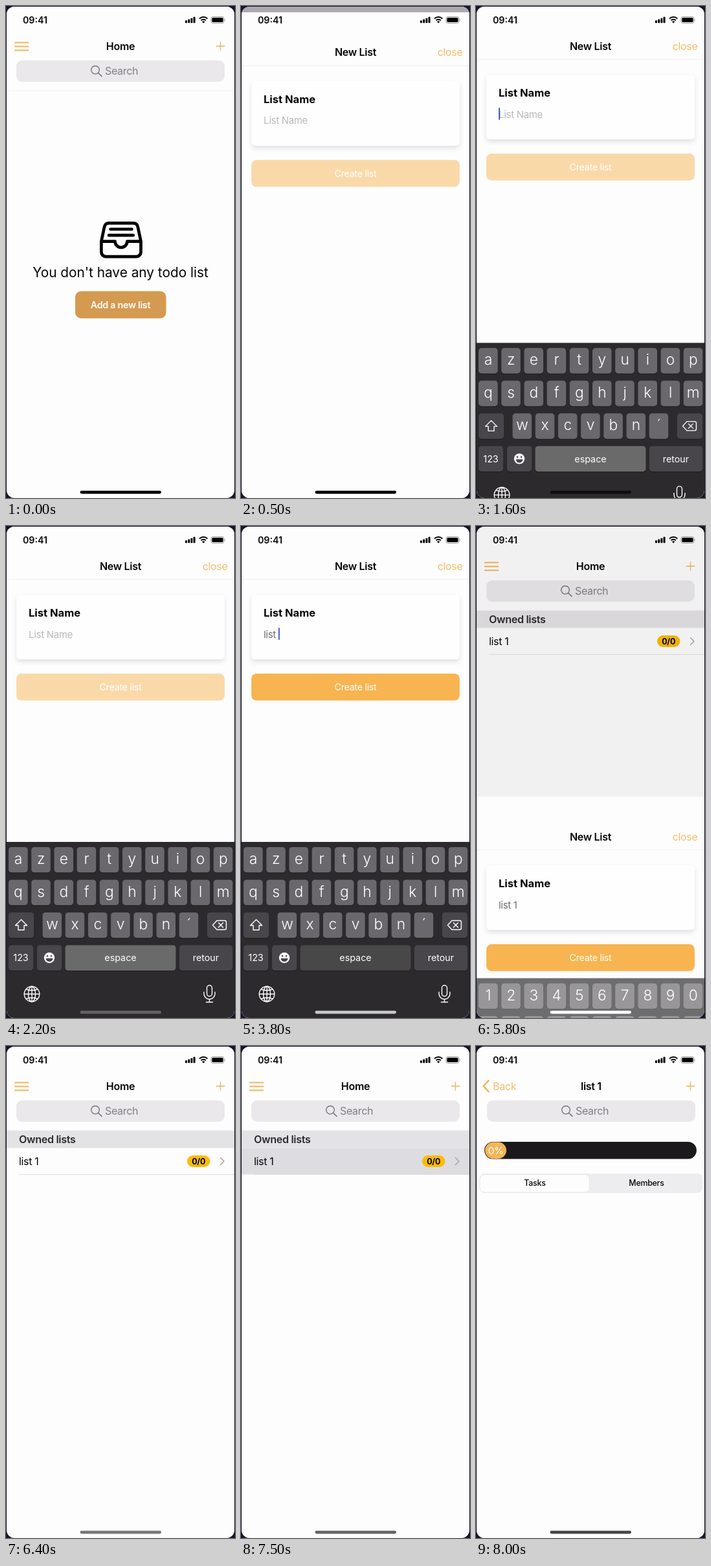
An HTML page for the animation above (8100 ms loop, 354 by 760 pixels).

```html
<!DOCTYPE html>
<html lang="en">
<head>
<meta charset="utf-8">
<title>Todo list demo</title>
<style>
html, body { margin: 0; width: 100%; height: 100%; overflow: hidden; background: #15142a; }
svg { display: block; width: 100vw; height: 100vh; }
svg { font-family: Inter, Roboto, sans-serif; letter-spacing: -0.02em; }
text { white-space: pre; }
.loose { letter-spacing: 0; }
</style>
</head>
<body>
<svg id="stage" viewBox="0 0 354 760"></svg>
<script>
const LOOP = 8100;
const PAPER = '#fdfdfd', INK = '#050505', AMBER = '#f7b450', SOFT = '#f3bd6d';
const KEY = '#6a686c', DARK_KEY = '#48464a';

// ---- markup helpers ----
const text = (x, cy, str, size, { w = 400, fill = INK, at = 'start', id = '', cls = '' } = {}) =>
  `<text id="${id}" class="${cls}" x="${x}" y="${(cy + size * 0.36).toFixed(2)}" font-size="${size}" font-weight="${w}" fill="${fill}" text-anchor="${at}" style="letter-spacing:${cls ? 0 : -0.02}em">${str}</text>`;
const box = (x, y, w, h, r, fill, more = '') =>
  `<rect x="${x}" y="${y}" width="${w}" height="${h}" rx="${r}" fill="${fill}" ${more}/>`;
const line = (d, color, width, more = '') =>
  `<path d="${d}" fill="none" stroke="${color}" stroke-width="${width}" ${more}/>`;
const group = (id, ...parts) => `<g id="${id}">${parts.join('')}</g>`;
const round = 'stroke-linecap="round" stroke-linejoin="round"';

const search = () =>
  box(16, 84, 322, 33, 9, '#eae8eb') +
  '<circle cx="138" cy="98.8" r="6.3" fill="none" stroke="#77757a" stroke-width="1.4"/>' +
  line('M142.6 103.4L148 108.6', '#77757a', 1.5, round) +
  text(153, 100.3, 'Search', 16, { fill: '#807e83' });

const emptyState = () => group('empty',
  line('M1 131H353', '#f1f0f2', 1),
  `<g transform="translate(140.3 323.6) scale(.147)" ${round}>` +
  line('M384 80H128c-26 0-43 14-48 40L48 272v112a48 48 0 0048 48h320a48 48 0 0048-48V272l-32-152c-5-27-23-40-48-40z' +
    'M48 272h144M320 272h144M192 272a64 64 0 00128 0M144 144h224M128 208h256', '#000', 32) + '</g>',
  text(177, 412, "You don't have any todo list", 20.8, { at: 'middle', cls: 'loose' }),
  box(107, 440.5, 140.5, 42, 9, AMBER, 'id="add"'),
  text(177, 461.5, 'Add a new list', 14.3, { w: 600, fill: '#fff', at: 'middle' }));

const ownedLists = () => group('owned',
  box(1, 130.5, 352, 27, 0, '#e3e2e4'),
  text(20, 144.3, 'Owned lists', 16.1, { w: 600, fill: '#2c2a2d' }),
  box(1, 157.5, 352, 41, 0, '#dddce0', 'id="row"'),
  text(20, 178, 'list 1', 16),
  box(280, 169, 35.5, 18, 9, '#fabb0a'),
  text(297.7, 178, '0/0', 12.6, { w: 700, at: 'middle' }),
  line('M331.5 172.5L337 178L331.5 183.5', '#a9a7ac', 1.6, round),
  line('M20 198.5H353', '#dedde0', 1));

const detail = () => group('detail',
  box(0, 78, 354, 682, 0, PAPER),
  search(),
  box(12, 148, 328, 26.5, 13.2, '#1b191c'),
  box(13, 148.5, 33, 25.5, 12.7, '#f4b656'),
  text(29.7, 161.5, '0%', 15, { fill: '#fff', at: 'middle' }),
  box(4.5, 197, 344.5, 30, 8, '#ededef'),
  box(5, 198.5, 169.5, 27.5, 7, '#fdfdfd', 'stroke="#e1e0e3" stroke-width=".8"'),
  text(90, 211.5, 'Tasks', 12.4, { w: 500, at: 'middle' }),
  text(262.5, 211.5, 'Members', 12.4, { w: 500, at: 'middle' }));

const header = () =>
  box(0, 0, 354, 79, 0, PAPER) +
  group('homeBar', line('M13 56.5H35M13 62.5H35M13 68.5H35', '#efb55f', 2)) +
  group('homeTitle', text(177, 62, 'Home', 16, { w: 600, at: 'middle' })) +
  group('backBar', line('M19.5 53.5L11.5 62L19.5 70.5', '#f2b24f', 2.5, round),
    text(26, 62, 'Back', 16, { fill: SOFT })) +
  group('listTitle', text(177, 62, 'list 1', 16, { w: 600, at: 'middle' })) +
  line('M324.7 62H338.3M331.5 55.2V68.8', '#f0b45c', 1.4);

const modal = () => group('modal',
  box(0, 0, 354, 760, 0, PAPER),
  text(177, 62, 'New List', 16, { w: 600, at: 'middle' }),
  text(342.5, 62, 'close', 16, { fill: SOFT, at: 'end' }),
  line('M1 82.5H353', '#f0f0f1', 1),
  box(16, 106, 322, 100, 6, '#fefefe', 'filter="url(#lift)"'),
  text(35, 134, 'List Name', 16.5, { w: 700, cls: 'loose' }),
  text(35, 167.3, '', 15, { id: 'field' }),
  box(0, 157, 2, 19, 1, '#4a5fc0', 'id="caret"'),
  box(16, 228, 322, 41.5, 8, AMBER, 'id="create"'),
  text(177, 249, 'Create list', 14.3, { fill: '#fff', at: 'middle' }));

// ---- keyboard ----
const PITCH = 35.2;
const key = (x, y, w, fill, more = '') =>
  box(x, y + 1, w, 39.3, 4.5, '#1b191c') + box(x, y, w, 39.3, 4.5, fill, more);
const keyRow = (chars, x, y, w = 29.6, pitch = PITCH) => [...chars].map((c, i) =>
  key(x + i * pitch, y, w, KEY) +
  `<text x="${x + i * pitch + w / 2}" y="${y + 26}" font-size="22.8" font-weight="350" fill="#fff" text-anchor="middle">${c.replace('&', '&amp;')}</text>`).join('');
const label = (x, str, more = {}) =>
  text(x, 667, str, 14.3, { fill: '#fff', at: 'middle', cls: 'loose', ...more });

const keyboard = () => group('keyboard',
  box(0, 488, 354, 274, 0, '#2c2a2d'),
  key(4, 597, 39, DARK_KEY), key(311, 597, 39, DARK_KEY),
  group('letters',
    keyRow('azertyuiop', 4, 496), keyRow('qsdfghjklm', 4, 546.5), keyRow('wxcvbn´', 56.5, 597),
    line('M23.5 608L14.5 617H19V624H28V617H32.5Z', '#fff', 1.4, round)),
  group('digits',
    keyRow('1234567890', 4, 496), keyRow('-/:;()€&@"', 4, 546.5), keyRow(".,?!'", 56.5, 597, 43.5, 49.3),
    text(23.5, 616.5, '#+=', 14, { fill: '#fff', at: 'middle' })),
  line('M326 609.5H338Q340.5 609.5 340.5 612V621Q340.5 623.5 338 623.5H326L319.5 616.5ZM328.5 613L335.5 620M335.5 613L328.5 620', '#fff', 1.4, round),
  key(4, 647.5, 38, DARK_KEY), key(48, 647.5, 38.3, DARK_KEY),
  key(91.5, 647.5, 171, DARK_KEY, 'id="space"'), key(268, 647.5, 82.3, DARK_KEY),
  label(23, '123', { id: 'mode' }), label(177, 'espace'), label(309, 'retour'),
  '<circle cx="67" cy="667" r="8.2" fill="#fff"/>',
  '<circle cx="64" cy="664.3" r="1.3" fill="#48464a"/><circle cx="70" cy="664.3" r="1.3" fill="#48464a"/>',
  '<path d="M61.5 667.8H72.5A5.5 5.3 0 0161.5 667.8Z" fill="#48464a"/>',
  '<g fill="none" stroke="#fff" stroke-width="1.4"><circle cx="40" cy="723" r="11.8"/><ellipse cx="40" cy="723" rx="5.5" ry="11.8"/>',
  '<path d="M40 711.2V734.8M28.2 723H51.8M31 715.5Q40 719.5 49 715.5M31 730.5Q40 726.5 49 730.5"/>',
  '<rect x="310.5" y="709.5" width="8" height="17" rx="4"/><path d="M306 720V722.5A8.5 8.5 0 00323 722.5V720M314.5 731V735.5M309.5 735.5H319.5" stroke-linecap="round"/></g>');

const statusBar = () =>
  text(26, 21.7, '09:41', 14.2, { w: 600, cls: 'loose' }) +
  [4, 5.7, 7.6, 9.6].map((h, i) => box(277 + i * 4.2, 26.3 - h, 3, h, 0.8, '#000')).join('') +
  line('M299 19.6A8.6 8.6 0 01311.4 19.6M301.5 22.2A5.2 5.2 0 01308.9 22.2', '#000', 2) +
  '<path d="M305.2 26.6L303 24.3A3.2 3.2 0 01307.4 24.3Z"/>' +
  box(317, 16.5, 20, 10, 2.8, 'none', 'stroke="#8b898d" stroke-width=".9"') +
  box(318.4, 17.9, 17.2, 7.2, 1.6, '#000') +
  '<path d="M338.2 19.8Q340 21.5 338.2 23.2Z" fill="#8b898d"/>';

document.getElementById('stage').innerHTML =
  '<defs><clipPath id="screen"><rect x="1" y="1" width="352" height="759" rx="12"/></clipPath>' +
  '<filter id="lift" x="-10%" y="-20%" width="120%" height="150%"><feDropShadow dx="0" dy="4" stdDeviation="3" flood-color="#55506a" flood-opacity=".16"/></filter></defs>' +
  '<g clip-path="url(#screen)">' +
  box(0, 0, 354, 760, 0, PAPER) +
  group('home', search(), emptyState(), ownedLists()) +
  detail() + header() +
  box(0, 0, 354, 760, 0, '#170a20', 'id="dim"') +
  modal() + keyboard() + statusBar() +
  box(114.5, 748.8, 125.5, 4.6, 2.3, '#000', 'id="bar"') + '</g>';

// ---- motion ----
const $ = Object.fromEntries([...document.querySelectorAll('[id]')].filter(e => e.id).map(e => [e.id, e]));
const show = (el, on) => { el.style.display = on ? '' : 'none'; };
const move = (el, x, y = 0) => el.setAttribute('transform', `translate(${x.toFixed(2)} ${y.toFixed(2)})`);
const clamp = v => Math.min(1, Math.max(0, v));
const fade = (el, v) => { el.style.opacity = clamp(v); };

// Critically damped spring: stiffness 1000, mass 3
const spring = (t, start) => {
  const u = Math.max(0, t - start) / 1000 * Math.sqrt(1000 / 3);
  return 1 - Math.exp(-u) * (1 + u);
};
const track = (points, t) => {
  const i = points.findIndex(p => p[0] > t);
  if (i < 0) return points[points.length - 1][1];
  const [t0, a] = points[i - 1], [t1, b] = points[i];
  return a + (b - a) * (t - t0) / (t1 - t0);
};
const gray = v => `rgb(${v},${v},${v})`;

const OPEN = 153, FOCUS = 1400, DIGITS = 4200, HIDE = 5646, CLOSE = 5700, TAP = 7300, PUSH = 7557;
const TYPED = [[2500, 'l'], [2800, 'li'], [3100, 'lis'], [3400, 'list'], [3700, 'list '], [4700, 'list 1']];
const BAR = [[0, 0], [1500, 0], [2200, 98], [2700, 185], [3800, 200], [5300, 200], [5800, 255],
  [5950, 210], [6500, 100], [7500, 100], [8000, 70]];
const SPACE = [[0, 106], [2250, 106], [2550, 72]];

function draw(t) {
  const listed = t > 5000;
  show($.empty, !listed);
  show($.owned, listed);
  show($.row, t >= TAP);
  $.add.setAttribute('fill', t < 400 ? '#d49a4f' : AMBER);

  const up = t < CLOSE ? spring(t, OPEN) : 1 - spring(t, CLOSE);
  move($.modal, 0, 760 * (1 - up));
  show($.modal, up > 0.0005);
  fade($.dim, 0.36 * up ** 2.5);

  const value = TYPED.reduce((s, [at, v]) => t >= at ? v : s, '');
  $.field.textContent = value || 'List Name';
  $.field.setAttribute('fill', value ? '#6d6b70' : '#b9b8bc');
  $.create.setAttribute('fill', value ? AMBER : '#fad9a9');
  const typing = TYPED.some(([at]) => t >= at && t < at + 500);
  show($.caret, t >= FOCUS && t < HIDE && (typing || (t - FOCUS) % 1000 < 600));
  $.caret.setAttribute('x', 35 + (value ? $.field.getComputedTextLength() : 0));

  const hide = spring(t, HIDE), keys = spring(t, FOCUS) * (1 - hide);
  show($.keyboard, keys > 0.002);
  move($.keyboard, 0, 272 * (1 - keys));
  fade($.keyboard, 1 - 0.4 * hide);
  show($.letters, t < DIGITS);
  show($.digits, t >= DIGITS);
  $.mode.textContent = t < DIGITS ? '123' : 'ABC';
  $.space.setAttribute('fill', gray(track(SPACE, t)));

  const push = spring(t, PUSH), x = 354 * (1 - push);
  move($.home, -106 * push);
  move($.detail, x);
  show($.detail, push > 0);
  move($.homeTitle, -130 * push);
  move($.listTitle, x);
  fade($.homeTitle, 1 - push * 1.5);
  fade($.homeBar, 1 - push * 2);
  fade($.listTitle, push * 1.5 - 0.5);
  fade($.backBar, push * 1.5 - 0.5);

  $.bar.setAttribute('fill', gray(Math.round(track(BAR, t))));
}

const begin = performance.now();
function tick() {
  draw((performance.now() - begin) % LOOP);
  requestAnimationFrame(tick);
}
tick();
</script>
</body>
</html>
```
